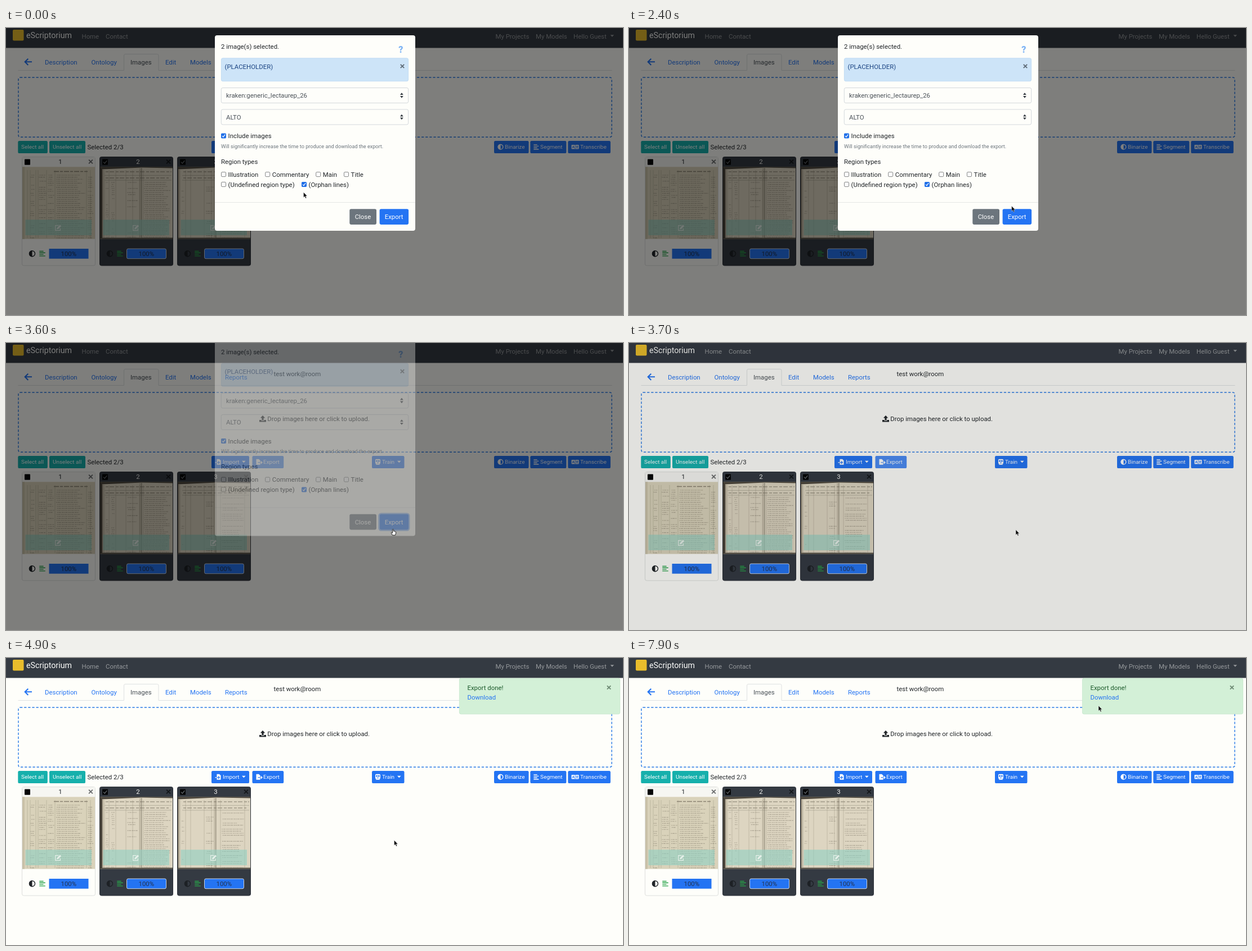
Recreate the animation shown at these times as an HTML page. Size 1096 by 511 pixels, loop 8000 ms.

```html
<!DOCTYPE html>
<html lang="en">
<head>
<meta charset="utf-8">
<title>Export dialog</title>
<style>
  html, body { margin: 0; width: 100%; height: 100%; overflow: hidden; background: #fefefa; }
  svg { display: block; width: 100%; height: 100%; font: 11.4px Roboto, sans-serif; }
  text { white-space: pre; }
</style>
</head>
<body>
<svg id="stage" viewBox="0 0 1096 511"></svg>
<script>
const BLUE = '#2474f3', DARK = '#343a42', PAPER = '#fefefa', INK = '#212529', TEAL = '#16b0ac';
const LOOP = 8000, STEP = 100;

const rect = (x, y, w, h, fill, more = '') =>
  `<rect x="${x}" y="${y}" width="${w}" height="${h}" fill="${fill}" ${more}/>`;
const text = (x, y, s, fill = INK, size = 11.4, more = '') =>
  `<text x="${x}" y="${y}" fill="${fill}" font-size="${size}" ${more}>${s}</text>`;
const path = (d, stroke, width = 1, more = '') =>
  `<path d="${d}" fill="none" stroke="${stroke}" stroke-width="${width}" ${more}/>`;
const shape = (d, fill, more = '') => `<path d="${d}" fill="${fill}" ${more}/>`;
const group = (id, body) => `<g id="${id}">${body}</g>`;
const at = (x, y, body) => `<g transform="translate(${x} ${y})">${body}</g>`;
const cross = (x, y, r, color) =>
  path(`M${x - r} ${y - r}l${2 * r} ${2 * r}m0 ${-2 * r}l${-2 * r} ${2 * r}`, color, 1.9);
const caret = (x, y, color) => shape(`M${x} ${y}h6.6l-3.3 3.5z`, color);

let seed = 7;
const random = () => (seed = (seed * 16807) % 2147483647) / 2147483647;

// Icons, each centred on its own origin
const contrast = (color, r = 5) =>
  `<circle r="${r - .7}" fill="none" stroke="${color}" stroke-width="1.4"/>` +
  shape(`M0 ${-r}A${r} ${r} 0 0 0 0 ${r}z`, color);
const alignLeft = (color, w = 9) =>
  path(`M${-w / 2} -4.2h${w * .7}M${-w / 2} -1.4h${w}M${-w / 2} 1.4h${w * .7}M${-w / 2} 4.2h${w}`, color, 1.4);
const fileIcon = shape('M-2.5-5H2L4.5-2.5V5H-2.5z', '#fff') +
  path('M-5 1H2M0-1.3L2.2 1L0 3.3', BLUE, 1.2) + path('M-5.5 1H-2.5', '#fff', 1.3);
const fileOutIcon = shape('M-5-5H-.5L2-2.5V5H-5z', '#fff') +
  path('M-2 1H2', BLUE, 1.2) + path('M2 1H5M3.2-1.3L5.5 1L3.2 3.3', '#fff', 1.3);
const trainIcon = shape('M-3-5H3Q4.5-5 4.5-3V2Q4.5 3.5 2.5 3.5L4 5H-4L-2.5 3.5Q-4.5 3.5-4.5 2V-3Q-4.5-5-3-5z', '#fff') +
  rect(-3.2, -3, 2.7, 2.6, BLUE) + rect(.5, -3, 2.7, 2.6, BLUE) + `<circle cy="1.6" r="1" fill="${BLUE}"/>`;
const languageIcon = rect(-6.5, -3.8, 13, 7.6, '#fff', 'rx=".8"') +
  path('M0-3.8V3.8M-5 2L-3.3-2.2L-1.6 2M-4.5 .7H-2M1.5-1.3H5.2M3.4-2.5V-1.3M4.6-1Q4 1.5 1.8 2.2M2.2-.5Q3 1.5 5 2.2', BLUE, .9);
const uploadIcon = shape('M0-6L4.2-1.6H1.6V2.6H-1.6V-1.6H-4.2z', INK) +
  shape('M-6 2H-2.4V3.5H2.4V2H6V5.5H-6z', INK);
const editIcon = path('M1-3.6H-4.8V5H3.8V1.5', '#f4f8f4', 1.2, 'opacity=".8"') +
  shape('M-2 .6L3.3-4.8L5.6-2.5L.3 2.7L-2.4 3z', '#f4f8f4', 'opacity=".8"');

function button(x, w, label, labelX, icon = '', iconX = 0, fill = BLUE) {
  return rect(x, 201, w, 22.1, fill, 'rx="2.2"') +
    (icon && at(iconX, 211.8, icon)) + text(labelX, 215.3, label, '#fff', 9.97);
}

// Soft stand-in for a scanned register: ruled columns and faint rows of writing
function ledger(x, top, columns, rules, paper) {
  let rows = '';
  for (let y = top; y < 374; y += 3.6)
    for (const [from, to, density] of columns)
      if (random() < density)
        rows += `M${(x + from + random() * 2).toFixed(1)} ${y.toFixed(1)}H${(x + to - random() * (to - from) * .3).toFixed(1)}`;
  return paper +
    path(rules.map(r => `M${x + r} 253V374`).join(''), '#8d8674', .6, 'opacity=".6"') +
    path(rows, '#6e6858', 1.1, 'stroke-dasharray="2 .8 4 1.2 3 .6" opacity=".42"');
}

const singlePage = x =>
  rect(x, 247.3, 129, 128.3, '#d9d2ba') + rect(x, 247.3, 4, 128.3, '#c9c1a8') +
  path(`M${x + 56} 255.5H${x + 116}`, '#77705f', 1.3, 'stroke-dasharray="9 2 5 2" opacity=".8"');

const openBook = (x, fold, margin) =>
  rect(x, 247.3, 129, 128.3, '#ddd5c1') +
  shape(`M${x} 247.3H${x + 129}V249.5L${x + fold} 248.6L${x + margin} 251.5V373.5H${x + 129}V375.6H${x}z`, '#4a443a') +
  rect(x + margin, 251, 2.5, 122.5, '#aaa28e', 'opacity=".7"') +
  rect(x + fold - 4, 249.5, 4, 124, '#b5ac97', 'opacity=".55"') +
  path(`M${x + fold} 249V374`, '#5d5648', .8, 'opacity=".7"') +
  path(`M${x + 8} 262.5H${x + 127}M${x + 8} 271H${x + 127}`, '#85806f', .7, 'opacity=".6"') +
  path(`M${x + 10} 256H${x + 127}M${x + 10} 267H${x + 122}`, '#6e6858', 1.5, 'stroke-dasharray="5 2 8 3" opacity=".55"');

function card(index, photo) {
  const x = 28 + index * 138, chosen = index > 0;
  return rect(x + .5, 229.5, 130, 193.5, chosen ? DARK : PAPER, `rx="3" stroke="${chosen ? '#2c3138' : '#dddfdd'}"`) +
    (chosen ? '' : rect(x + 1, 230, 129, 17, '#f6f6f2')) +
    rect(x + 5, 233.5, 10, 10.3, '#050607', 'rx="1"') +
    (chosen ? path(`M${x + 7} 238.7l2.3 2.4l4-5`, '#6b7074', 1.1) : '') +
    text(x + 68.5, 242, index + 1, chosen ? '#f4f4f2' : INK, 11.4, 'text-anchor="middle"') +
    cross(x + 122.5, 238, 3.4, chosen ? '#15181b' : '#6d6f70') +
    photo +
    rect(x + 6.5, 341.3, 117.5, 27.7, '#8fd0c3', 'opacity=".6"') +
    at(x + 64.5, 355.3, editIcon) +
    at(x + 18.5, 401.7, contrast(chosen ? '#1d2125' : INK, 5.7)) +
    at(x + 36.5, 401.7, alignLeft('#27a349', 10.5)) +
    rect(x + 48.5, 393, 70, 17.7, BLUE, chosen ? 'rx="2.5" stroke="#f4f4f2" stroke-width=".8"' : '') +
    text(x + 83.3, 405.8, '100%', '#23324e', 11.4, 'text-anchor="middle"');
}

function page() {
  const nav = '#96999c';
  const tabs = [[69, 'Description'], [151.5, 'Ontology'], [283, 'Edit'], [327, 'Models'], [389, 'Reports']];
  return rect(0, 0, 1096, 511, PAPER) +
    rect(0, 0, 1096, 35.5, DARK) + rect(12, 3, 19.5, 19.5, '#e9bd2c', 'rx="2"') +
    text(36, 18, 'eScriptorium', '#fdfdfb', 14.24) +
    text(134.5, 18.5, 'Home', nav) + text(177, 18.5, 'Contact', nav) +
    text(869.5, 18.5, 'My Projects', nav) + text(941, 18.5, 'My Models', nav) +
    text(1008, 18.5, 'Hello Guest', nav) + caret(1073.5, 12.3, nav) +
    path('M21.5 75.5H209.5V49Q209.5 46.5 212 46.5H268.5Q271 46.5 271 49V75.5H1076.5', '#dee1e2', 1) +
    path('M46 60.3H34M39.3 54.7L33.7 60.3L39.3 65.9', BLUE, 2.1) +
    tabs.map(([x, label]) => text(x, 65.3, label, BLUE)).join('') +
    text(221, 65.3, 'Images', '#495057') +
    text(475.5, 59, 'test work@room') +
    rect(22, 88, 1054, 106.2, 'none', 'rx="3" stroke="#2a7be6" stroke-width="1.42" stroke-dasharray="4.27 2.85"') +
    at(456, 135, uploadIcon) + text(464.3, 139, 'Drop images here or click to upload.') +
    button(21.3, 52.5, 'Select all', 27, '', 0, TEAL) +
    button(77, 64, 'Unselect all', 83, '', 0, TEAL) +
    text(144.5, 216, 'Selected 2/3') +
    button(365, 67, 'Import', 385, fileIcon, 377) + caret(419, 209.8, '#fff') +
    group('pageExport', button(437.5, 55.7, 'Export', 457, fileOutIcon, 449.5)) +
    button(650, 57.5, 'Train', 668, trainIcon, 660.5) + caret(695, 209.8, '#fff') +
    button(867, 61.5, 'Binarize', 886, contrast('#fff'), 878.5) +
    button(931.3, 64, 'Segment', 949, alignLeft('#fff'), 941.8) +
    button(998.3, 75.5, 'Transcribe', 1020, languageIcon, 1011) +
    card(0, ledger(29, 262, [[14, 22, .5], [29, 43, .75], [45, 57, .7], [60, 112, 1], [116, 126, .8]],
      [9, 14, 24, 28, 43, 58, 114, 121], singlePage(29))) +
    card(1, ledger(167, 275, [[10, 15, .6], [20, 26, .5], [48, 68, .35], [78, 125, 1]],
      [8, 16, 28, 46, 58, 70, 77], openBook(167, 74, 4))) +
    card(2, ledger(305, 276, [[6, 12, .35], [50, 64, .3], [78, 118, .75]],
      [4, 14, 23, 47, 60, 76, 119], openBook(305, 68, 1)));
}

function checkbox(x, y, label, checked) {
  return (checked
      ? rect(x, y - 4.5, 9, 9, '#1f6fe8', 'rx="1.6"') + path(`M${x + 2} ${y + .2}l1.9 2l3.3-4.4`, '#fff', 1.3)
      : rect(x + .5, y - 4, 8, 8, '#fff', 'rx="1.5" stroke="#77797a" stroke-width=".9"')) +
    text(x + 12.6, y + 4.2, label);
}

const select = (y, value) =>
  rect(382.3, y, 332.4, 27, PAPER, 'rx="2.8" stroke="#cfd4d8" stroke-width=".9"') +
  text(391, y + 17.6, value, '#495057') +
  shape(`M700 ${y + 12.5}l2.9-3.7l2.9 3.7zM700 ${y + 14.5}l2.9 3.7l2.9-3.7z`, '#343a40');

const modal =
  rect(371, 13, 356, 348, PAPER, 'rx="4"') +
  text(382, 37.3, '2 image(s) selected.') +
  text(697.3, 43.6, '?', '#7db3f4', 16, 'font-weight="900"') +
  rect(382.4, 53.7, 332.2, 41, '#cde4f8', 'rx="2.8" stroke="#b9d7f2" stroke-width=".8"') +
  text(388.5, 72.7, '(PLACEHOLDER)', '#1b4482') + cross(704, 68, 3.2, '#5f6c78') +
  select(106.5, 'kraken:generic_lectaurep_26') + select(145, 'ALTO') +
  checkbox(382, 191.9, 'Include images', true) +
  text(382, 213.8, 'Will significantly increase the time to produce and download the export.', '#6c757d', 9.12) +
  text(382, 242, 'Region types') +
  checkbox(382, 260.6, 'Illustration') + checkbox(460.2, 260.6, 'Commentary') +
  checkbox(550.2, 260.6, 'Main') + checkbox(600, 260.6, 'Title') +
  checkbox(382, 278.4, '(Undefined region type)') + checkbox(525, 278.4, '(Orphan lines)', true) +
  path('M371 310.5H727', '#e2e4e4', .9) +
  rect(610.3, 322.3, 47.7, 27.6, '#6c757d', 'rx="2.8"') + text(619.7, 340.2, 'Close', '#fff') +
  rect(662.4, 321.2, 53.8, 29.8, 'none', 'id="ring" rx="4" stroke="#8db9f7" stroke-width="2.4"') +
  rect(663.6, 322.3, 51.5, 27.6, BLUE, 'id="submit" rx="2.8"') + text(672.7, 340.2, 'Export', '#fff');

const toast =
  rect(805.4, 36.2, 285.2, 63.6, '#d3f0d7', 'rx="2.8" stroke="#c4e6cb" stroke-width=".8"') +
  text(819.5, 57.3, 'Export done!', '#1c5a2b') +
  group('link', text(819.5, 74.4, 'Download')) + cross(1071, 52.5, 3.2, '#6d8a73');

const arrow = shape('M0 0V9.2L2.1 7.3L3.6 10.7L5.2 10L3.7 6.7H6.5z', '#0a0a0a', 'stroke="#eee" stroke-width=".5"');
const hand = shape('M-.9 .4Q0-.4 .9 .4V3.6Q3 3.2 5 4.7V7.6L4 10.6H-1L-3 7Q-3.4 5.6-2 5.8L-.9 7z', '#fff',
  'stroke="#111" stroke-width=".9" stroke-linejoin="round"');

const stage = document.getElementById('stage');
stage.innerHTML = page() + group('toast', toast) +
  rect(0, 0, 1096, 511, '#000', 'id="backdrop"') + group('modal', modal) +
  group('cursor', group('arrow', arrow) + group('hand', hand));
const part = id => document.getElementById(id);
const set = (id, name, value) => part(id).setAttribute(name, value);
const show = (id, on) => set(id, 'opacity', on ? 1 : 0);
const clamp = v => Math.min(1, Math.max(0, v));

// Pointer waypoints: time, x, y
const route = [
  [0, 528.5, 292.5], [1300, 528.5, 292.5], [1400, 553.5, 291.6], [1800, 637, 299], [2200, 670, 308.5],
  [2300, 674, 312], [2600, 691, 327], [2800, 695.5, 331], [2900, 695.5, 331], [3000, 687.5, 331.5],
  [3600, 687.5, 331.5], [3700, 687, 332.5], [4800, 687, 332.5], [4900, 689.5, 324.5], [5300, 772, 185],
  [5700, 827.5, 81], [5900, 827, 79], [6300, 827, 79], [6400, 830, 74], [6600, 842, 70],
  [6900, 1063, 42], [7000, 1040, 36], [7200, 822, 52], [7300, 815, 46], [7500, 809, 62], [7900, 834, 85]
];

function pointerAt(t) {
  const i = Math.max(1, route.findIndex(p => p[0] >= t));
  const [t0, x0, y0] = route[i - 1], [t1, x1, y1] = route[i];
  const k = (t - t0) / (t1 - t0);
  return [x0 + (x1 - x0) * k, y0 + (y1 - y0) * k];
}

function draw(t) {
  const [x, y] = pointerAt(t);
  const open = t < 3700;
  const overSubmit = open && x > 663 && x < 716 && y > 322 && y < 350;
  const overLink = t > 3850 && x > 819 && x < 871 && y > 64 && y < 77.5;

  set('cursor', 'transform', `translate(${x} ${y})`);
  show('arrow', !(overSubmit || overLink));
  show('hand', overSubmit || overLink);
  set('submit', 'fill', overSubmit && t < 3600 ? '#1b5fca' : BLUE);
  show('ring', t >= 3200);

  const lift = 1 - (1 - clamp((t - 3500) / 300)) ** 1.67;
  set('modal', 'transform', `translate(0 ${-35.6 * lift})`);
  set('modal', 'opacity', 1 - clamp((t - 3500) / 150));
  set('backdrop', 'opacity', .5 * (1 - clamp((t - 3600) / 130)));
  set('pageExport', 'opacity', t < 3800 ? .82 : 1);

  show('toast', t > 3850);
  const link = part('link').firstChild;
  link.setAttribute('fill', overLink ? '#1b5fca' : BLUE);
  link.setAttribute('text-decoration', overLink ? 'underline' : 'none');
}

function tick() {
  draw(Math.floor(performance.now() % LOOP / STEP) * STEP);
  requestAnimationFrame(tick);
}
tick();
</script>
</body>
</html>
```
